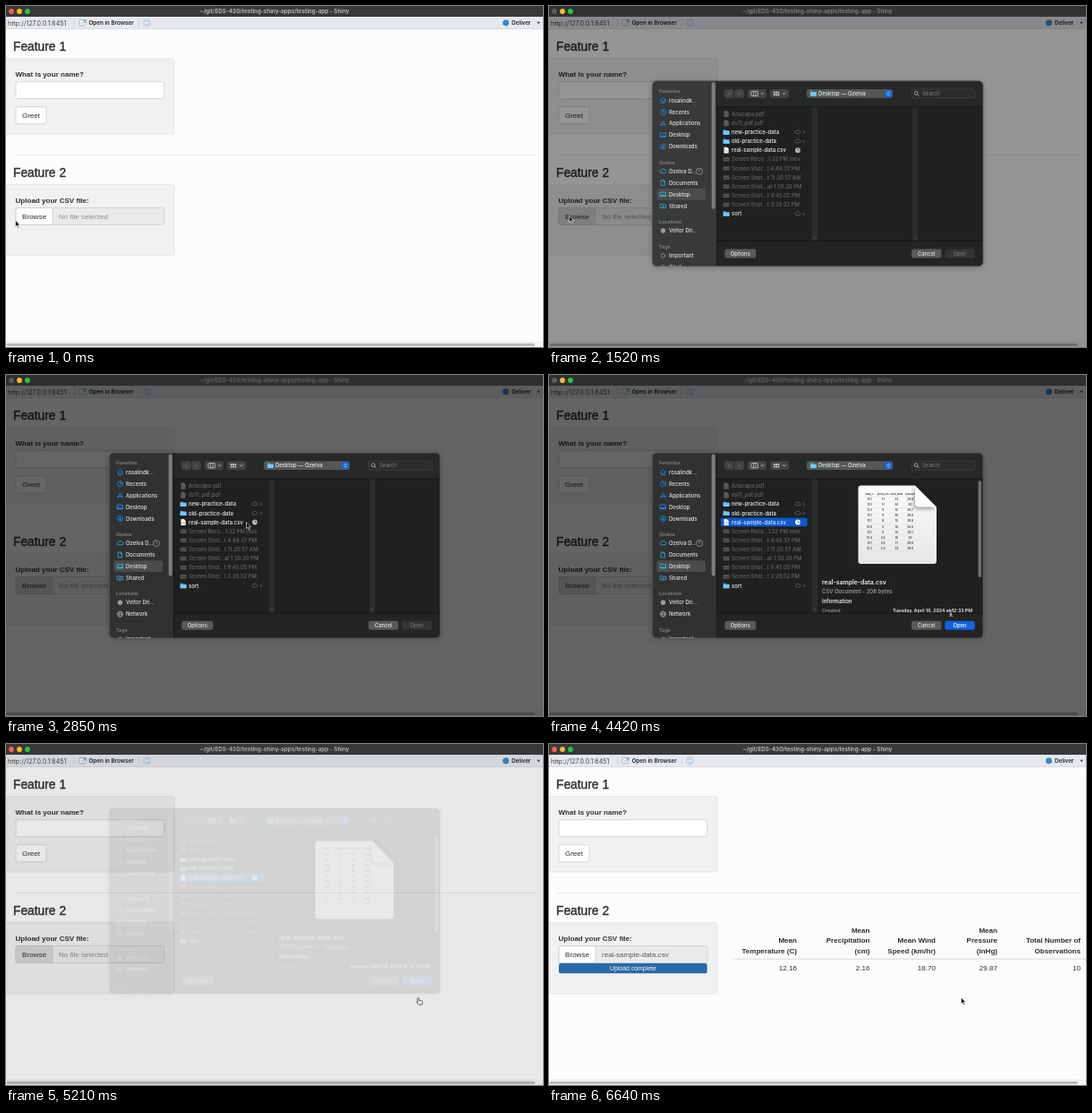
These frames come from a looping animation (600x381 px, 6.67 s). An HTML page:

```html
<!DOCTYPE html>
<html lang="en">
<head>
<meta charset="utf-8">
<title>Testing app</title>
<style>
html, body { margin: 0; width: 100%; height: 100%; overflow: hidden; background: #fcfcfc; }
svg { display: block; width: 600px; height: 381px; }
text { font-family: Inter, "Noto Sans", sans-serif; white-space: pre; }
.h { font-family: "Liberation Sans", Arial, sans-serif; }
.b { font-weight: 700; }
.m { font-weight: 500; }
.s { font-weight: 600; }
.r { text-anchor: end; }
.c { text-anchor: middle; }
</style>
</head>
<body>
<svg id="stage" viewBox="0 0 600 381"></svg>
<script>
const LOOP = 6670;
const CLOUD = 'Ozelva';

// y is the vertical centre of the line
const text = (s, x, y, size, fill, cls = '', more = '') =>
  `<text x="${x}" y="${y + size * 0.36}" font-size="${size}" fill="${fill}" class="${cls}" ${more}>${s}</text>`;
const rect = (x, y, w, h, fill, r = 0, more = '') =>
  `<rect x="${x}" y="${y}" width="${w}" height="${h}" rx="${r}" fill="${fill}" ${more}/>`;
const line = (d, color, w = 0.7, fill = 'none') =>
  `<path d="${d}" stroke="${color}" stroke-width="${w}" fill="${fill}" stroke-linecap="round" stroke-linejoin="round"/>`;
const dot = (x, y, r, fill, more = '') => `<circle cx="${x}" cy="${y}" r="${r}" fill="${fill}" ${more}/>`;
const ring = (x, y, r, color) => dot(x, y, r, 'none', `stroke="${color}" stroke-width=".7"`);
const group = (id, body, more = '') => `<g id="${id}" ${more}>${body}</g>`;
const edge = c => `stroke="${c}" stroke-width=".7"`;
const DARK = '#2f2f2f', EM = 8.05;

function page() {
  const heading = (s, y) => text(s, 8, y, 13.8, DARK, 'h', `stroke="${DARK}" stroke-width=".4"`);
  const well = (y, h) => rect(-3, y, 191, h, '#f1f1f1', 2.3, edge('#dedede'));
  const columns = [
    [277, ['Mean', 'Temperature (C)'], '12.16'],
    [358.5, ['Mean', 'Precipitation', '(cm)'], '2.16'],
    [432, ['Mean Wind', 'Speed (km/hr)'], '18.70'],
    [501, ['Mean', 'Pressure', '(inHg)'], '29.87'],
    [594, ['Total Number of', 'Observations'], '10']];
  const table = columns.map(([x, head, value]) =>
    head.map((s, i) => text(s, x, 231 - 11.5 * (head.length - 1 - i), EM, DARK, 'h b r')).join('') +
    text(value, x, 250, EM, DARK, 'h r')).join('') + rect(205, 239.6, 395, 1.1, '#d9d9d9');

  return rect(0, 0, 600, 381, '#fcfcfc') +
    heading('Feature 1', 45.5) + well(58.8, 84.2) +
    text('What is your name?', 10.5, 76, EM, DARK, 'h b') +
    rect(11, 84.6, 165.8, 19, '#fdfdfd', 2.3, edge('#c9c9c9')) +
    rect(11, 112.6, 34, 19.2, '#fdfdfd', 2.3, edge('#c9c9c9')) +
    text('Greet', 28, 122.3, EM, DARK, 'h c') +
    rect(8, 166.2, 584, 0.7, '#e4e4e4') +
    heading('Feature 2', 186.5) + well(199.6, 79.4) +
    text('Upload your CSV file:', 10.5, 217, EM, DARK, 'h b') +
    rect(11, 225.5, 165.8, 19, '#e9ebeb', 2.3, edge('#c9c9c9')) +
    `<path id="browse" d="M52 225.5H13.3a2.3 2.3 0 0 0-2.3 2.3v14.4a2.3 2.3 0 0 0 2.3 2.3H52Z" ${edge('#c5c5c5')}/>` +
    text('Browse', 31.5, 235.3, EM, DARK, 'h c') +
    text('No file selected', 59, 235.3, EM, '#8b8d8d', 'h', 'id="empty"') +
    group('done', text('real-sample-data.csv', 59, 235.3, EM, '#555', 'h') +
      rect(11, 245, 165.8, 11.5, '#f3f3f3', 2.3) +
      '<svg id="bar" x="11" y="245" height="11.5">' + rect(0, 0, '100%', 11.5, '#2b69a6', 2.3) +
      text('Upload complete', '50%', 5.8, 6.9, '#fff', 'h c') + '</svg>') +
    group('table', table) +
    rect(0, 375.5, 600, 5.5, '#f5f5f5') + rect(0, 375.2, 600, 0.5, '#dcdcdc') +
    rect(0.5, 377, 590.5, 3, '#b9b9b9', 1.5) +
    // viewer toolbar
    rect(0, 12, 600, 13.3, '#e5e9ed') + rect(0, 25, 600, 0.7, '#cdd1d5') +
    text('http://127.0.0.1:6451', 2, 19, 7.1, '#444') +
    rect(76, 14.5, 0.6, 8.5, '#c3c7cb') + rect(148, 14.5, 0.6, 8.5, '#c3c7cb') +
    rect(82, 15.6, 6.2, 6.2, '#fafafa', 1, edge('#8c9aa8')) + line('M84.5 19.5 89 16M86.7 15.8H89V18', '#4f86bb') +
    text('Open in Browser', 92.5, 19, 6.3, '#222', 's') +
    dot(157.5, 18.8, 3.9, '#edf3f9', edge('#90afd0')) +
    line('M155.6 18.2a2 2 0 0 1 3.6-.6M159.4 19.4a2 2 0 0 1-3.6.6', '#7ba1ca', 0.8) +
    dot(558.5, 18.8, 3.5, '#3c86c6') + text('Deliver', 565, 19, 6.3, '#222', 's') +
    '<path d="M593.2 17.8h3.6L595 20.2Z" fill="#444"/>';
}

const titleBar = () => rect(0, 0, 600, 12, '#393939') + rect(0, 0, 600, 12, '#000', 0, 'id="barShade"') +
  ['#fe5f57', '#febc2e', '#28c840'].map((c, i) => dot(6 + 9 * i, 6, 2.9, c, `id="light${i}"`)).join('') +
  text('~/git/EDS-430/testing-shiny-apps/testing-app - Shiny', 300, 6, 6.35, '#c4c4c4', 'c s', 'id="title"');

// 6 x 6 glyphs centred on the origin
const glyphs = {
  home: 'M-3 0 0-3 3 0M-2.1-.6V2.7H2.1V-.6M0 2.5V.8',
  clock: 'M3 0A3 3 0 1 1-3 0 3 3 0 1 1 3 0M0-1.8V0H1.4',
  apps: 'M-2.6 2.6 0-2.7 2.6 2.6M-3 1H3',
  desk: 'M-3-2.3H3V2.2H-3ZM-3 1H3M-3 1.6H3',
  down: 'M3 0A3 3 0 1 1-3 0 3 3 0 1 1 3 0M0-1.6V1.5M-1.2.4 0 1.6 1.2.4',
  cloud: 'M-2 1.8a1.4 1.4 0 0 1 0-2.8 2 2 0 0 1 3.8-.4 1.6 1.6 0 0 1 .3 3.2Z',
  doc: 'M-2-2.9H.6L2-1.4V2.9H-2ZM.5-2.8V-1.3H2',
  share: 'M-3-2H-.6L0-1.3H3V2.3H-3ZM-1 1.3a1 1 0 0 1 2 0M0-.2V0',
  globe: 'M3 0A3 3 0 1 1-3 0 3 3 0 1 1 3 0M-3 0H3M0-3C-2-1-2 1 0 3 2 1 2-1 0-3'
};
const glyph = (name, x, y, color, scale = 1) =>
  `<g transform="translate(${x} ${y}) scale(${scale})">${line(glyphs[name], color, 0.8)}</g>`;
const folder = (x, y) => `<path d="M${x} ${y - 2.6}h2.6l.8.8h3.4v4.5h-6.8Z" fill="#55b5f2"/>` +
  rect(x, y - 1.1, 6.8, 3.8, '#74c8fa', 0.6);
const sheet = (x, y, fill) => `<path d="M${x} ${y - 3.4}h3.4l1.8 1.8v5h-5.2Z" fill="${fill}"/>` +
  line(`M${x + 1.1} ${y}h3M${x + 1.1} ${y + 1.5}h3`, '#8a8a8a', 0.4);
const arrows = (x, y) => line(`M${x - 1.2} ${y - 0.8} ${x} ${y - 2} ${x + 1.2} ${y - 0.8}M${x - 1.2} ${y + 0.8} ${x} ${y + 2} ${x + 1.2} ${y + 0.8}`, '#fff', 0.7);

function sidebar() {
  const BLUE = '#1b8df5', TEAL = '#35b4d6', GREY = '#a9aaaa';
  const head = (s, y) => text(s, 123, y, 5.3, '#858686', 's');
  const row = (icon, s, y, color) => glyph(icon, 127.5, y, color) + text(s, 134, y, 5.95, '#e4e4e4', 'm');
  const rows = (list, y, color) => list.map(([icon, s], i) => row(icon, s, y + 12.9 * i, color)).join('');
  const tag = (s, y) => ring(127.5, y, 2.2, GREY) + text(s, 134, y, 5.95, '#e4e4e4', 'm');
  return rect(115, 86, 73, 210, '#303131') + rect(115, 86, 73, 210, '#fff', 0, 'id="glow"') +
    rect(187.4, 86, 0.8, 210, '#0d0d0d') + rect(120.5, 207.2, 54.5, 12.8, '#4b4c4c', 2.5) +
    head('Favorites', 98) +
    rows([['home', 'rosalindk...'], ['clock', 'Recents'], ['apps', 'Applications'], ['desk', 'Desktop'], ['down', 'Downloads']], 108.8, BLUE) +
    head(CLOUD, 178) +
    rows([['cloud', CLOUD + ' D...'], ['doc', 'Documents'], ['desk', 'Desktop'], ['share', 'Shared']], 188, TEAL) +
    ring(168, 188, 3.5, GREY) + line('M168 186V188', GREY) +
    head('Locations', 244) +
    dot(127.5, 254.3, 2.7, '#9c9d9d') + text('Veltor Dri...', 134, 254.3, 5.95, '#e4e4e4', 'm') +
    group('network', row('globe', 'Network', 267.2, GREY)) +
    group('tags', head('Tags', 285) + tag('Important', 295.2) + tag('Work', 308)) +
    rect(181.7, 88.5, 4, 136, '#7d7e7e', 2, 'id="scroll"');
}

function files() {
  const y = i => 124 + 10.13 * i;
  const shot = s => 'Screen Shot...' + s + ' PM';
  const names = ['Anacapa.pdf', 'ds11_pdf.pdf', 'new-practice-data', 'old-practice-data', 'real-sample-data.csv',
    'Screen Reco...1.32 PM.mov', shot('t 4.48.37'), 'Screen Shot...t 11.20.57 AM', shot('at 1.50.20'),
    shot('t 9.45.05'), shot('t 3.28.52'), 'sort'];
  const open = [2, 3, 4, 11];
  let plain = '', active = '';
  names.forEach((s, i) => {
    const label = text(s, 204, y(i), 5.95, '#f0f0f0', 'm');
    if (!open.includes(i)) {
      plain += label + (i < 2 ? sheet(195.5, y(i), '#ddd')
        : rect(194.7, y(i) - 2.2, 6.8, 4.4, '#c9cbcb') + rect(195.3, y(i) - 0.4, 5.6, 1.2, '#777'));
    } else if (i === 4) {
      active += label + sheet(195.5, y(i), '#fafafa') + dot(278, y(i), 2.9, '#b8b9b9', 'id="pie"') +
        line(`M278 ${y(i) - 2}V${y(i)}H280`, '#444', 0.6);
    } else {
      active += label + folder(194.7, y(i)) + glyph('cloud', 278, y(i), '#6a6b6b', 0.9) +
        line(`M284.3 ${y(i) - 1.3}l1.3 1.3-1.3 1.3`, '#858686', 0.7);
    }
  });
  return rect(192, y(4) - 4.9, 96.6, 9.6, '#0b58d0', 2, 'id="pick"') + group('plain', plain) + active;
}

function preview() {
  const data = ['temp_c precip_cm wind_kmhr pressure', '12.1 1.1 22 29.8', '13.1 1.1 23 30', '11.5 0 15 29.7', '12.1 0 20 29.8',
    '11.1 8 15 29.9', '10.9 0 16 29.9', '12.1 0 14 30.1', '12.4 3.4 19 30', '13.1 5.8 11 29.8', '12.2 2.2 22 29.8'];
  const cells = data.map((row, i) => row.split(' ').map((s, j) =>
    text(s, 358 + 15.2 * j, 132.8 + 6.1 * i, i ? 3.1 : 2.6, '#333', 'c s')).join('') +
    rect(351, 135.8 + 6.1 * i, 58, 0.3, '#cfcfcf')).join('');
  return rect(300, 116.5, 185, 149.5, '#1f2020') +
    '<linearGradient id="paper" x2="0" y2="1"><stop stop-color="#fcfcfc"/><stop offset="1" stop-color="#e6e6e6"/></linearGradient>' +
    '<clipPath id="sheet"><path d="M348.5 123.5H409L433 147.5V208a3 3 0 0 1-3 3H348.5a3 3 0 0 1-3-3V126.5a3 3 0 0 1 3-3Z"/></clipPath>' +
    '<g clip-path="url(#sheet)">' + rect(345, 123, 89, 89, 'url(#paper)') + cells +
    '<path d="M409 123.5V143.500a4 4 0 0 0 4 4H433Z" fill="#fbfbfb" style="filter:drop-shadow(-1px 2px 2px #0006)"/></g>' +
    text('real-sample-data.csv', 305, 232, 6.9, '#eee', 's') +
    text('CSV Document - 208 bytes', 305, 242, 6, '#a5a6a6', 'm') +
    text('Information', 305, 253.3, 6, '#eee', 's') +
    text('Created', 305, 263.5, 5.4, '#a0a1a1', 'm') +
    text('Tuesday, April 16, 2024 at 12:33 PM', 473, 263.5, 5.2, '#eee', 'r s') +
    rect(479.5, 118, 3.6, 108, '#6d6e6e', 1.8);
}

function dialog() {
  const button = (s, x, w, id, color = '#e8e8e8') => rect(x, 274.8, w, 10, '#585959', 2.3, `id="${id}"`) +
    text(s, x + w / 2, 279.8, 5.95, color, 'c m', `id="${id}Text"`);
  const control = (x, w) => rect(x, 96.3, w, 9.8, '#424343', 2.3);
  const chevron = x => line(`M${x - 1.4} 100.5l1.4 1.4 1.4-1.4`, '#ddd', 0.8);
  return rect(115.5, 87, 369.5, 207, '#1f2020', 5, 'style="filter:drop-shadow(0 1px 3px #0004)"') +
    '<clipPath id="frame">' + rect(115.5, 87, 369.5, 207, '#fff', 5) + '</clipPath><g clip-path="url(#frame)">' +
    sidebar() + rect(188, 87, 298, 29, '#272828') + rect(188, 115.8, 298, 0.7, '#101010') +
    control(196, 10.4) + control(207.4, 10.4) +
    line('M202 99.5l-1.7 1.7 1.7 1.7M211.7 99.5l1.7 1.7-1.7 1.7', '#737474', 0.8) +
    control(222, 21) + rect(226, 98.6, 7.4, 5.2, 'none', 0.6, edge('#ddd')) + line('M228.5 98.6v5.2M231 98.6v5.2', '#ddd', 0.6) + chevron(238.5) +
    control(247, 21) + [0, 1, 2, 3, 4, 5].map(i => rect(250.8 + i % 3 * 2.4, 99 + (i / 3 | 0) * 2.6, 1.7, 1.8, '#ddd')).join('') + chevron(262.8) +
    rect(288, 96.3, 96, 9.8, '#555656', 2.3) + folder(292, 101.2) +
    text('Desktop — ' + CLOUD, 301, 101.2, 6, '#eee', 'm') +
    rect(375.3, 97.2, 7.8, 8, '#1667dc', 2) + arrows(379.2, 101.2) +
    rect(405, 96.3, 71, 9.8, '#2a2b2b', 2.3, edge('#444545')) + ring(410.3, 100.7, 1.9, '#ccc') + line('M411.7 102.2l1.6 1.6', '#ccc') +
    text('Search', 417, 101.2, 6, '#828383') +
    files() +
    [293.6, 406].map(x => rect(x, 116.5, 6.6, 149.5, '#2b2c2c') + line(`M${x + 2.4} 260.5v3M${x + 3.8} 260.5v3`, '#666', 0.4)).join('') +
    group('preview', preview()) +
    rect(188, 266, 298, 28, '#232424') + rect(188, 265.7, 298, 0.7, '#101010') +
    button('Options', 196.3, 35, 'options') + button('Cancel', 405, 33.5, 'cancel') + button('Open', 442.3, 33.5, 'open') +
    '</g>' + rect(115.5, 87, 369.5, 207, 'none', 5, 'stroke="#606161" stroke-width=".6"');
}

const cursors = '<g id="arrow"><path d="M0 0V7.2L1.7 5.6 2.8 8.2 4 7.7 2.9 5.2H5.1Z" fill="#000" stroke="#fff" stroke-width=".6"/></g>' +
  group('beam', line('M-1.5-3.5Q0-3.5 0-2.5V2.5Q0 3.5-1.5 3.5M1.5-3.5Q0-3.5 0-2.5M0 2.5Q0 3.5 1.5 3.5M-1 1H1', '#ddd', 0.8)) +
  group('hand', line('M-.6 4.6V.6q.7-.9 1.4 0V3l3.2.7q.8.3.7 1.2L4.2 8H.6L-1.7 5.2q.2-1 1.1-.6Z', '#222', 0.7, '#fff'));

document.getElementById('stage').innerHTML = page() +
  rect(0, 12, 600, 369, '#000', 0, 'id="shade"') + titleBar() + group('dialog', dialog()) + group('cursor', cursors);

const el = id => document.getElementById(id);
const set = (id, name, value) => el(id).setAttribute(name, value);
const show = (id, on) => { el(id).style.display = on ? '' : 'none'; };
const smooth = u => u * u * (3 - 2 * u);

// value at time t from [time, value] keys
function track(t, keys, ease = u => u) {
  const i = keys.findIndex(k => k[0] > t);
  if (i < 0) return keys[keys.length - 1][1];
  if (i === 0) return keys[0][1];
  const [t0, a] = keys[i - 1], [t1, b] = keys[i];
  return a + (b - a) * ease((t - t0) / (t1 - t0));
}

function draw(t) {
  const between = (a, b) => t >= a && t < b;
  const shade = track(t, [[1300, 0], [1390, 0.16], [1520, 0.41], [1660, 0.6], [5020, 0.6], [5210, 0.08], [5245, 0]]);
  set('shade', 'opacity', shade);
  set('barShade', 'opacity', shade * 0.3);
  set('title', 'opacity', 1 - shade * 1.1);
  set('light0', 'fill', between(1300, 5100) ? '#5c5c5c' : '#fe5f57');

  show('dialog', between(1300, 5240));
  set('dialog', 'opacity', track(t, [[1300, 0], [1390, 0.54], [1480, 1], [5040, 1], [5210, 0.11], [5240, 0]]));
  set('dialog', 'transform', `translate(0 ${track(t, [[1300, -20], [1565, 0], [5020, 0], [5270, -20]])})`);
  // the sidebar is translucent, so a bright page shines through
  set('glow', 'opacity', (0.6 - shade) * 0.2);
  set('plain', 'opacity', t < 1470 ? 1 : 0.33);
  const loaded = t >= 2000;
  show('network', loaded);
  set('tags', 'transform', `translate(0 ${loaded ? 0 : -12.9})`);
  set('scroll', 'height', loaded ? 136 : 141.5);
  const picked = t >= 3000;
  show('pick', picked);
  set('pie', 'fill', picked ? '#fff' : '#b8b9b9');
  show('preview', t >= 3180);
  set('open', 'fill', !picked ? '#333434' : between(4900, 5010) ? '#3b86f2' : '#1063dc');
  set('openText', 'fill', picked ? '#fff' : '#717272');

  set('browse', 'fill', t < 120 || t >= 5560 ? '#fdfdfd' : between(800, 5560) ? '#d6d6d6' : '#e6e6e6');
  const uploaded = t >= 5600;
  show('empty', !uploaded);
  show('done', uploaded);
  set('bar', 'width', track(t, [[5600, 0], [6150, 165.8]], smooth));
  show('table', t >= 5820);

  const x = track(t, [[30, 10.5], [270, 22.5], [1850, 22.5], [2800, 268.5], [3700, 268.5], [4420, 449], [4580, 460.5]], smooth);
  const y = track(t, [[30, 239.5], [270, 234.5], [1850, 234.5], [2800, 164.5], [3700, 164.5], [4420, 266], [4580, 283.3]], smooth);
  set('cursor', 'transform', `translate(${x} ${y})`);
  const beam = between(4340, 4450), hand = between(5040, 5330);
  show('beam', beam);
  show('hand', hand);
  show('arrow', !beam && !hand);
}

function frame() {
  draw(performance.now() % LOOP);
  requestAnimationFrame(frame);
}
frame();
</script>
</body>
</html>
```
